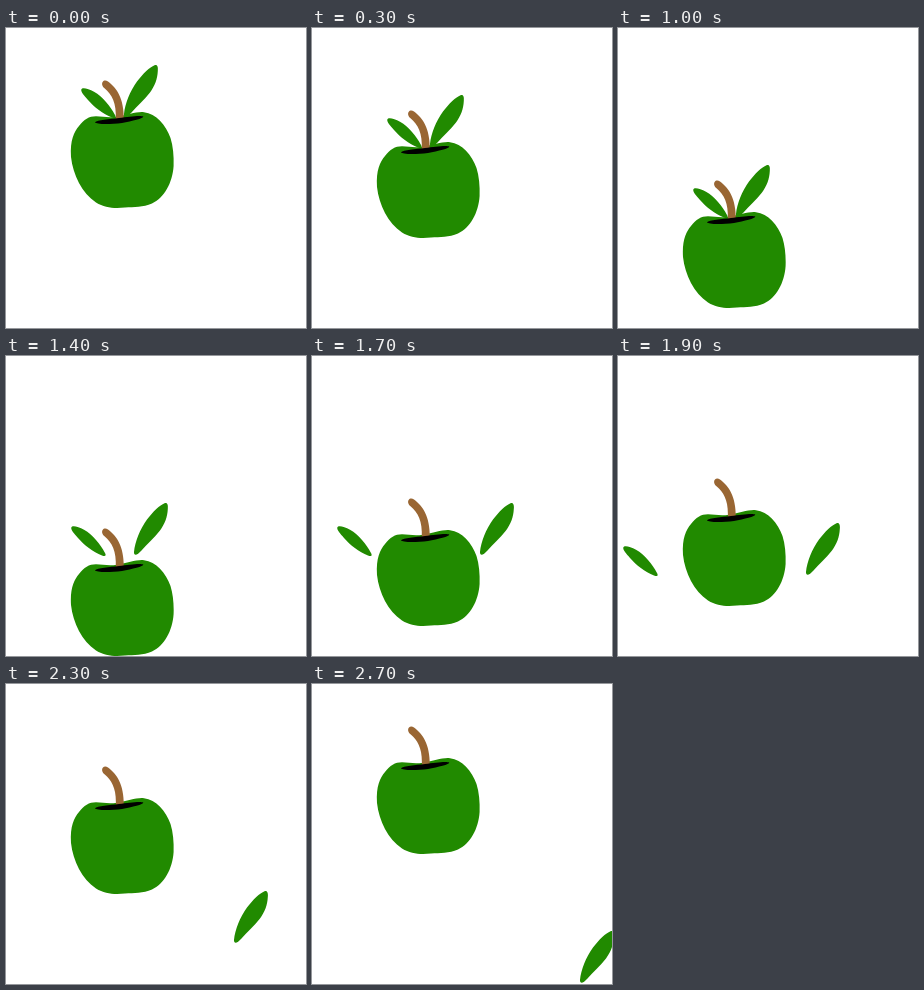
These frames come from a looping animation (300 px wide and 300 px high, 2800 ms). An HTML page:

```html
<!DOCTYPE html>
<html lang="en">
<head>
<meta charset="utf-8">
<title>Bouncing apple</title>
<style>
  html, body { margin: 0; width: 100%; height: 100%; overflow: hidden; background: #fff; }
  svg { display: block; width: 100vw; height: 100vh; }
</style>
</head>
<body>
<svg viewBox="0 0 300 300" fill="#218a00">
  <g id="apple">
    <path d="M90 88.3C97 88.6 103 90 111 88.7C122 87 130 83.5 138 84.2C150 85.5 160 97 164.5 110C167 118 168 128 167.6 138C166.5 155 158 170 146 175.5C137 179.3 128 178.8 119 179.6C108 180.6 99 180 90 174.5C76 165 67 147 65 129C64 112 68 104 73 98C78 91.5 83 88.3 90 88.3Z"/>
    <path fill="#996633" d="M96.3 57.2C95.2 53.5 98.8 50.8 102 53.6C111 60.5 117.8 70 117.8 91L109.8 91.5C110.6 75 106 66.5 98.5 60.3Q96.8 59 96.3 57.2Z"/>
    <path fill="#000" d="M89 94.3C91 91.8 104 91.2 113 90C123 88.6 135 87 137.3 88.6C137.8 90.4 126 93.4 116 94.9C105 96.5 90 96.6 89 94.3Z"/>
  </g>
  <path id="left" d="M75.3 61.6C76 59 82 60.5 88 63.8C97 69 104 78 109 87C110.6 90 109 90.6 106 89.4C97 86 88 79 82 72C78 67.5 74.8 64 75.3 61.6Z"/>
  <path id="right" d="M118 86C119 76 124 63 131 53.5C137 45.5 144 39 148.5 37.2C151.5 36.2 152.2 39 151.8 43C151.4 51 149 57.5 144 64.5C138 72.5 131 78 125.5 84.5C121 89.6 117.8 90 118 86Z"/>
</svg>
<script>
  const STEP = 100, STEPS = 28, IMPACT = 13;
  const [apple, left, right] = ["apple", "left", "right"].map(id => document.getElementById(id));
  const move = (part, x, y) => part.setAttribute("transform", `translate(${x} ${y})`);

  // Leaves stay on the apple until impact, hop outwards, then fall away.
  function leafOffset(n) {
    if (n <= IMPACT) return [0, 10 * n];
    if (n < 16) return [10 * (n - 13), 250 - 10 * n];
    return [10 * (n - 12), 10 * (n - 6)];
  }

  function draw(now) {
    const n = Math.floor(now / STEP) % STEPS;
    const [x, y] = leafOffset(n);
    move(apple, 0, 10 * (IMPACT - Math.abs(n - IMPACT)));
    move(left, -x, y);
    move(right, x, y);
  }

  let start;
  function tick(now) {
    start ??= now;
    draw(now - start);
    requestAnimationFrame(tick);
  }
  draw(0);
  requestAnimationFrame(tick);
</script>
</body>
</html>
```
